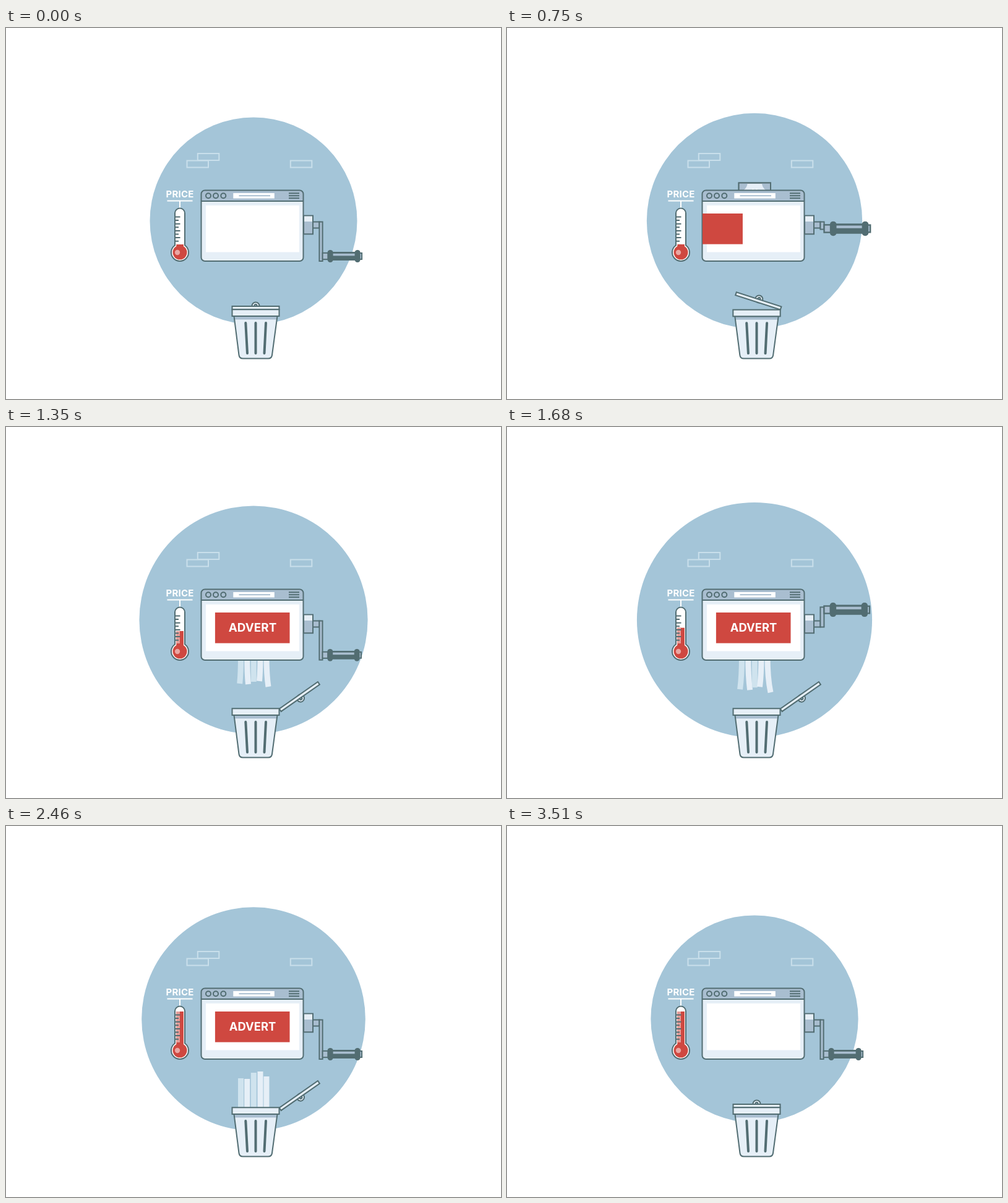
Recreate the animation shown at these times as an HTML page. Size 800x600 px, loop 3600 ms.

```html
<!DOCTYPE html>
<html lang="en">
<head>
<meta charset="utf-8">
<title>Price and adverts</title>
<style>
html, body { margin: 0; width: 100%; height: 100%; overflow: hidden; background: #fff; }
svg { display: block; width: 800px; height: 600px; }
text { font-family: Inter, "Open Sans", sans-serif; font-weight: 700; fill: #fff; text-anchor: middle; }
.line { stroke: #526d72; stroke-width: 2; }
.ink { fill: #526d72; }
.pale { fill: #e6eff7; }
.steel { fill: #a9bed0; }
.red { fill: #cf4840; }
.white { fill: #fff; }
.none { fill: none; }
</style>
</head>
<body>
<svg viewBox="0 0 800 600">
  <defs>
    <clipPath id="glass"><rect x="316" y="282" width="164" height="94"/></clipPath>
  </defs>
  <circle id="disc" cx="400" cy="312" r="167.5" fill="#a4c5d8"/>
  <g class="none" stroke="#c9dfeb" stroke-width="2">
    <rect x="292.5" y="214.5" width="34.5" height="11"/>
    <rect x="309.8" y="203" width="34.5" height="11"/>
    <rect x="459.8" y="214.5" width="34.5" height="11"/>
  </g>

  <text x="281" y="274" font-size="15" letter-spacing=".2">PRICE</text>
  <path d="M260.5 279.6H301.5M281 280V292" stroke="#fff" stroke-width="2"/>
  <path class="line white" d="M273 299.5a8 8 0 0 1 16 0V351.5a14 14 0 1 1 -16 0Z"/>
  <circle class="red" cx="281" cy="363" r="11.5"/>
  <rect id="column" class="red" x="275.3" width="11.6"/>
  <rect id="shine" x="275.3" width="5.7" fill="#e59d99"/>
  <circle cx="277" cy="363" r="4.2" fill="#eba7a3"/>
  <path id="ticks" class="line none" stroke-width="1.6"/>

  <g id="bill">
    <rect class="line pale" x="-25.7" y="-46.5" width="51.4" height="93"/>
    <path id="corners" class="steel"/>
    <path d="M-2.8-37V-22M3.2-37V-22M-2.8 22V37M3.2 22V37" stroke="#fff" stroke-width="2.2"/>
    <rect class="line none" x="-25.7" y="-46.5" width="51.4" height="93"/>
    <circle class="line steel" r="15"/>
    <text font-size="22" y="8" transform="rotate(90)">$</text>
  </g>
  <g id="strips" class="none" stroke-width="9"></g>

  <g class="line">
    <rect class="steel" x="481" y="303.5" width="15" height="29.8"/>
    <rect class="steel" x="496" y="313.5" width="10.5" height="10"/>
    <rect id="arm" class="steel" x="506.4"/>
  </g>
  <rect class="pale" x="482" y="304.5" width="13" height="8.5"/>
  <g id="grip">
    <rect class="line steel" x="0" y="-5.2" width="9" height="10.4"/>
    <rect class="line steel" x="58" y="-5" width="5.5" height="10"/>
    <rect class="ink" x="12" y="-7" width="44" height="14" rx="1"/>
    <rect class="steel" x="14" y="-4.2" width="41" height="3.6"/>
    <rect class="ink" x="8" y="-10" width="9" height="20" rx="4.2"/>
    <rect class="ink" x="52" y="-10" width="9" height="20" rx="4.2"/>
  </g>

  <rect class="pale" x="315.5" y="262.5" width="165" height="114.5" rx="6"/>
  <path class="steel" d="M315.5 280V268.5a6 6 0 0 1 6-6H474.5a6 6 0 0 1 6 6V280Z"/>
  <g class="line none">
    <path d="M315.5 280H480.5M457 267.2H474M457 271.2H474M457 275.2H474"/>
    <circle cx="327" cy="271.3" r="4"/>
    <circle cx="339" cy="271.3" r="4"/>
    <circle cx="351.3" cy="271.3" r="4"/>
  </g>
  <rect class="white" x="367.3" y="267" width="66.5" height="8.6"/>
  <path d="M376.5 271.3H427" stroke="#a9bed0" stroke-width="2"/>
  <rect class="white" x="323" y="287" width="151" height="75.5"/>
  <rect class="line none" x="315.5" y="262.5" width="165" height="114.5" rx="6"/>
  <g clip-path="url(#glass)">
    <rect id="ad" class="red" x="-60.3" y="-24.8" width="120.6" height="49.6"/>
    <text id="label" font-size="18.4" y="6.6">ADVERT</text>
  </g>

  <g id="bin">
    <g id="lid">
      <circle class="line pale" cx="403.5" cy="449.5" r="6"/>
      <circle class="line" cx="403.5" cy="449" r="2" fill="#a4c5d8" stroke-width="1.5"/>
      <rect class="line pale" x="365.5" y="450" width="76" height="5.2"/>
    </g>
    <path class="pale" d="M368.5 466L376.5 529q.8 5.5 6 5.5H424q5.200 0 6-5.500L438.500 466Z"/>
    <path class="steel" d="M369 466H438L437.400 471.500H369.700Z"/>
    <path class="line none" d="M368.500 466L376.500 529q.8 5.500 6 5.500H424q5.200 0 6-5.500L438.500 466Z"/>
    <rect class="line pale" x="365.500" y="455.300" width="76" height="10.700"/>
    <path stroke="#526d72" stroke-width="4" stroke-linecap="round" d="M387.300 477L390 526M403.500 477V526M420 477L417.500 526"/>
  </g>
</svg>
<script>
const LOOP = 3600, STEP = 30;
const $ = id => document.getElementById(id);
const set = (el, attrs) => { for (const k in attrs) el.setAttribute(k, attrs[k]); };
const clamp = v => Math.max(0, Math.min(1, v));
const part = (t, a, b) => clamp((t - a) / (b - a));
const inOut = u => u < .5 ? 2 * u * u : 1 - 2 * (1 - u) * (1 - u);
const backOut = u => 1 + 2.7 * (u - 1) ** 3 + 1.7 * (u - 1) ** 2;
const bump = (t, a, b) => Math.sin(Math.PI * part(t, a, b)) ** 2;

// Monotone cubic curve through [time, value] points.
function curve(...pts) {
  const n = pts.length - 1;
  const rate = i => (pts[i + 1][1] - pts[i][1]) / (pts[i + 1][0] - pts[i][0]);
  const slope = i => {
    if (i === 0 || i === n) return 0;
    const a = rate(i - 1), b = rate(i);
    return a * b > 0 ? 2 * a * b / (a + b) : 0;
  };
  return t => {
    if (t <= pts[0][0]) return pts[0][1];
    if (t >= pts[n][0]) return pts[n][1];
    const i = pts.findIndex(p => p[0] > t) - 1;
    const [t0, v0] = pts[i], [t1, v1] = pts[i + 1], h = t1 - t0, u = (t - t0) / h;
    const d = v1 - v0, a = slope(i) * h, b = slope(i + 1) * h;
    return v0 + u * (a + u * (3 * d - 2 * a - b + u * (a + b - 2 * d)));
  };
}

const level = curve([700, 350], [1020, 345.5], [1350, 330], [2010, 319.500], [2460, 300]);
const crank = curve([480, 0], [570, 20], [1020, 200], [1350, 355], [2010, 586], [2460, 720]);
const billY = curve([210, 164], [480, 220], [900, 318]);
const stripEnd = curve([830, 374], [1020, 391], [1350, 415], [2010, 435], [2200, 468], [2400, 500]);
const stripTop = curve([2180, 364], [2460, 404], [2600, 475]);
const bend = curve([1020, 0], [1350, .5], [2010, 1], [2300, 0]);

// x, end offset, top offset, sideways bend, colour
const strips = [
  [379.5, 0, 4, -3.5, "#cfe3ee"],
  [389.7, 1, 5, 3.5, "#e6eff7"],
  [400.3, -3, -5, 0, "#cfe3ee"],
  [411, -4, -7, -3, "#e6eff7"],
  [421, 5, 1, 6, "#e6eff7"]
].map(s => {
  const el = document.createElementNS("http://www.w3.org/2000/svg", "path");
  set(el, { stroke: s[4] });
  $("strips").append(el);
  return [el, ...s];
});

let ticks = "";
for (let i = 0; i < 8; i++) ticks += `M274 ${305.5 + i * 5.6}h${i % 2 ? 5 : 7.5}`;
set($("ticks"), { d: ticks });

let corners = "";
for (const x of [-1, 1]) for (const y of [-1, 1])
  corners += `M${25.7 * x} ${46.5 * y}h${-14 * x}A14 14 0 0 ${x * y > 0 ? 1 : 0} ${25.7 * x} ${32.5 * y}Z`;
set($("corners"), { d: corners });

function drawCrank(t) {
  const a = crank(t) * Math.PI / 180, c = Math.cos(a);
  const size = 1 + .177 * Math.sin(a), y = 318.5 + 50.5 * c, tip = y + 8 * c * size;
  const top = Math.min(313.5, tip), low = Math.max(323.5, tip);
  set($("arm"), { y: top, height: low - top, width: 5.2 * size });
  set($("grip"), { transform: `translate(${506.400 + 5.200 * size} ${y}) scale(${size})` });
}

function drawStrips(t) {
  const end = stripEnd(t), top = stripTop(t), k = bend(t);
  const shown = t > 830 && t < 2610;
  set($("strips"), { visibility: shown ? "visible" : "hidden" });
  for (const [el, x, de, dt, side] of strips) {
    const y0 = Math.max(370, top + dt), y1 = Math.max(y0, Math.min(500, end + de));
    set(el, { d: `M${x} ${y0}Q${x} ${y0 + (y1 - y0) * .6} ${x + side * k} ${y1}` });
  }
}

function drawAd(t) {
  const x = 398.2 - 143 * (1 - inOut(part(t, 420, 1110))) + 150 * inOut(part(t, 2640, 3180));
  const grow = 1 + .055 * bump(t, 1740, 2280);
  set($("ad"), { transform: `translate(${x} 324.800) scale(${grow})` });
  const pop = t < 2000 ? backOut(part(t, 990, 1410)) : 1 - inOut(part(t, 2520, 2730));
  set($("label"), { transform: `translate(398.500 324.200) scale(${Math.max(0, pop)})` });
}

function drawBin(t) {
  const turn = 145 * (inOut(part(t, 690, 930)) - inOut(part(t, 2580, 2760)));
  set($("lid"), { transform: `rotate(${turn} 441.500 455.500)` });
  const squash = .025 * (bump(t, 720, 930) + bump(t, 2500, 2720));
  set($("bin"), { transform: `translate(403.500 535) scale(${1 + squash} ${1 - squash}) translate(-403.500 -535)` });
}

function draw(t) {
  const u = 1 - Math.abs(t - LOOP / 2) / (LOOP / 2);
  set($("disc"), { r: 167.5 + 24.3 * (2 * u * u - u ** 3) });

  const y = level(t);
  set($("column"), { y, height: 356 - y });
  set($("shine"), { y, height: Math.max(0, 350 - y) });

  const pop = inOut(part(t, 60, 240));
  set($("bill"), {
    transform: `translate(400.300 ${billY(t)}) scale(${pop})`,
    visibility: t > 60 && t < 900 ? "visible" : "hidden"
  });
  drawStrips(t);
  drawCrank(t);
  drawAd(t);
  drawBin(t);
}

function tick(now) {
  const t = Math.floor((now % LOOP) / STEP) * STEP;
  draw(t < 60 ? 0 : Math.min(t, 3510));
  requestAnimationFrame(tick);
}
tick(0);
</script>
</body>
</html>
```
